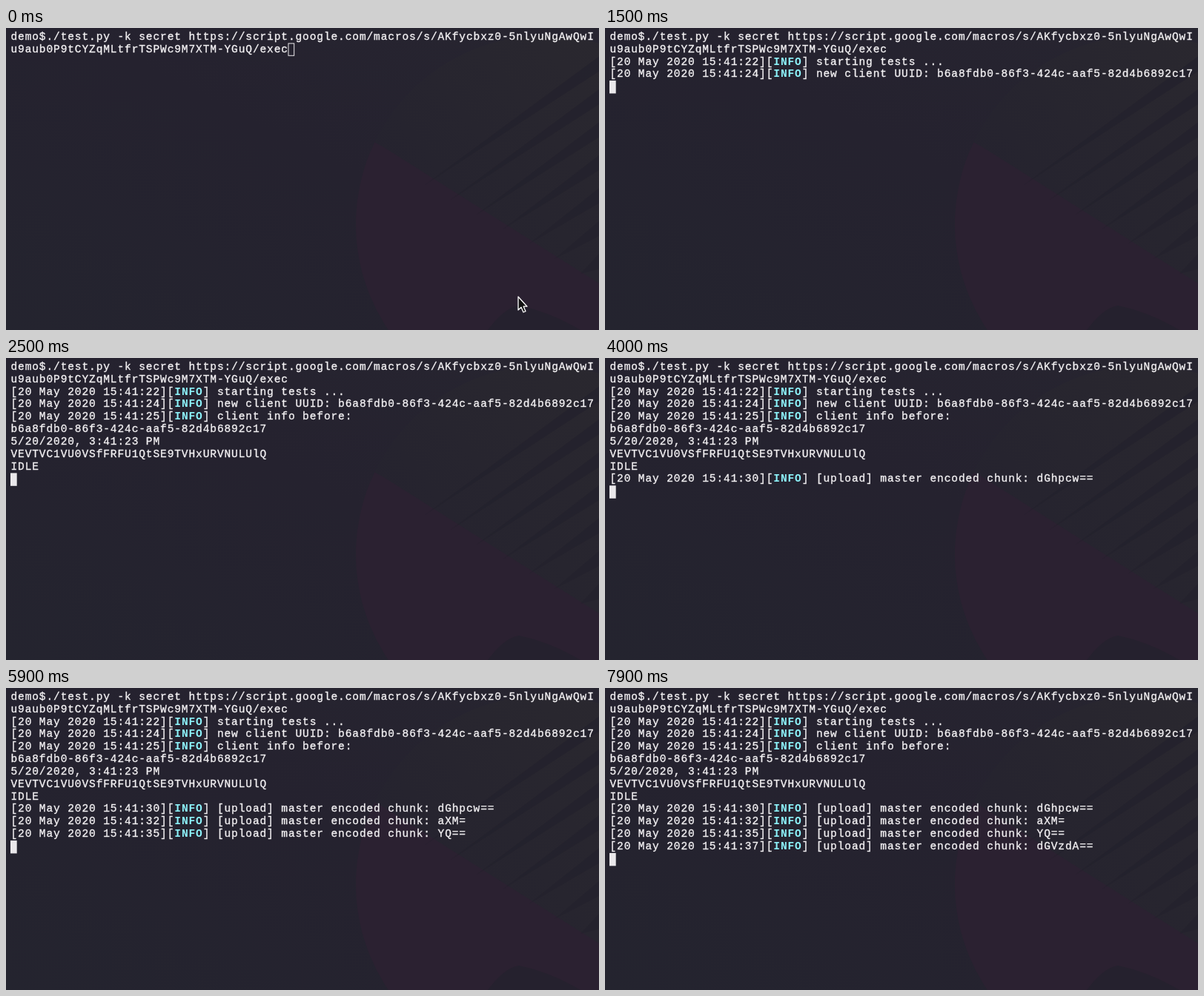
An HTML page for the animation above (8000 ms loop, 800 by 408 pixels).

```html
<!DOCTYPE html>
<html lang="en">
<head>
<meta charset="utf-8">
<title>Terminal session</title>
<style>
  html, body { margin: 0; width: 100%; height: 100%; overflow: hidden; background: #25232f; }
  svg { display: block; width: 800px; height: 408px; }
  text {
    font: 14.5px "Liberation Mono", "Courier New", monospace; letter-spacing: .9px;
    fill: #f3f1f3; stroke: #f3f1f3; stroke-width: .35px; white-space: pre;
  }
  .tag { font-weight: bold; fill: #8df3fb; stroke: none; }
</style>
</head>
<body>
<svg viewBox="0 0 800 408">
  <defs>
    <linearGradient id="sky" x1="0" y1="1" x2="1" y2="0">
      <stop offset="0" stop-color="#24242f"/>
      <stop offset=".55" stop-color="#25222f"/>
      <stop offset="1" stop-color="#272530"/>
    </linearGradient>
    <linearGradient id="glow" x1="0" y1="1" x2="1" y2="0">
      <stop offset=".3" stop-color="#25232f"/>
      <stop offset="1" stop-color="#2a282f"/>
    </linearGradient>
    <clipPath id="disc"><circle cx="727" cy="265" r="255"/></clipPath>
  </defs>
  <rect width="800" height="408" fill="url(#sky)"/>
  <g clip-path="url(#disc)">
    <rect x="470" width="330" height="408" fill="url(#glow)"/>
    <path d="M470 140L508 160L800 345V408H470Z" fill="#2b2131"/>
    <g id="rays" fill="#24222d" opacity=".8"></g>
    <path d="M650 408Q672 378 692 375Q735 384 775 408Z" fill="#25212e"/>
  </g>
  <g id="lines"></g>
  <rect id="caret"/>
  <path id="mouse" d="M691 363V381L695 377.3L698 384L701 382.7L698.2 376.2H703Z"
        fill="#111" stroke="#fff" stroke-width="1.3" stroke-linejoin="round"/>
</svg>
<script>
const NS = "http://www.w3.org/2000/svg";
const $ = id => document.getElementById(id);
const LOOP = 8000, LEFT = 6, PITCH = 16.83, CHAR = 9.602;
const UUID = "b6a8fdb0-86f3-424c-aaf5-82d4b6892c17";

const info = (time, msg) => [`[20 May 2020 15:41:${time}][`, "INFO", `] ${msg}`];
const chunk = (time, data) => info(time, `[upload] master encoded chunk: ${data}`);

// Each entry: time of output, then the rows printed
const output = [
  [0, "demo$./test.py -k secret https://script.google.com/macros/s/AKfycbxz0-5nlyuNgAwQwI",
      "u9aub0P9tCYZqMLtfrTSPWc9M7XTM-YGuQ/exec"],
  [1000, info(22, "starting tests ...")],
  [1500, info(24, "new client UUID: " + UUID)],
  [2100, info(25, "client info before:"), UUID, "5/20/2020, 3:41:23 PM",
      "VEVTVC1VU0VSfFRFU1QtSE9TVHxURVNULUlQ", "IDLE"],
  [4000, chunk(30, "dGhpcw==")],
  [4900, chunk(32, "aXM=")],
  [5800, chunk(35, "YQ==")],
  [6700, chunk(37, "dGVzdA==")]
];

function setAttrs(el, attrs) {
  for (const key in attrs) el.setAttribute(key, attrs[key]);
}

function add(parent, tag, attrs, content = "") {
  const el = document.createElementNS(NS, tag);
  setAttrs(el, attrs);
  el.textContent = content;
  return parent.appendChild(el);
}

for (let i = 0; i < 7; i++) {
  const x = 565 + 35 * i, y = 212 + 20 * i, end = y - 0.7 * (800 - x);
  add($("rays"), "path", { d: `M${x} ${y}L800 ${end - 9}V${end + 11}Z` });
}

const rows = [];
for (const [time, ...printed] of output) {
  for (const row of printed) {
    const el = add($("lines"), "text", { x: LEFT + 0.45, y: 16 + PITCH * rows.length });
    [].concat(row).forEach((part, i) =>
      add(el, "tspan", i === 1 ? { class: "tag" } : {}, part));
    rows.push({ time, el });
  }
}

function setCaret(col, row, solid) {
  const inset = solid ? 0 : 0.5;
  setAttrs($("caret"), {
    x: LEFT + col * CHAR + inset,
    y: 3.5 + row * 16.88 + inset,
    width: 8.7 - 2 * inset,
    height: 17.4 - 2 * inset,
    fill: solid ? "#eae8eb" : "none",
    stroke: solid ? "none" : "#eae8eb"
  });
}

function draw(t) {
  let count = 0;
  for (const { time, el } of rows) {
    const shown = t >= time;
    el.setAttribute("visibility", shown ? "visible" : "hidden");
    if (shown) count++;
  }
  if (t < 900) setCaret(39, 1, t >= 100);
  else setCaret(0, count, true);
  $("mouse").setAttribute("opacity", Math.max(0, 1 - Math.floor(t / 100) / 5));
}

const start = performance.now();
function tick() {
  draw((performance.now() - start) % LOOP);
  requestAnimationFrame(tick);
}
tick();
</script>
</body>
</html>
```
